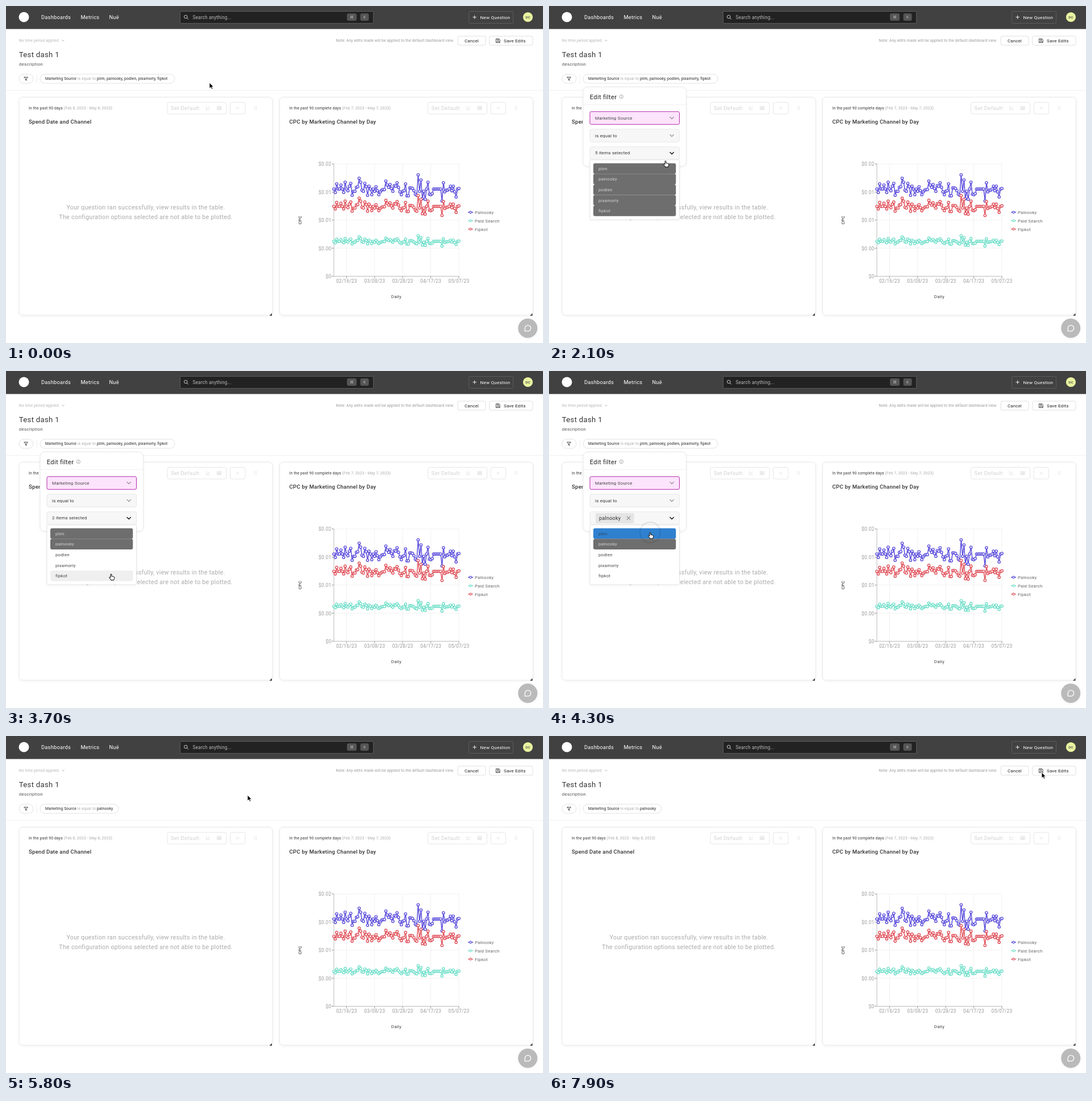
Animation of 945 by 593 pixels, one loop 8000 ms. Source, as an HTML page:

```html
<!DOCTYPE html>
<html lang="en">
<head>
<meta charset="utf-8">
<title>Dashboard filter</title>
<style>
  html, body { margin: 0; width: 100%; height: 100%; overflow: hidden; background: #fff; }
  svg { display: block; width: 945px; height: 593px; }
  text { font-family: Roboto, "Liberation Sans", sans-serif; letter-spacing: .025em; }
  .mid { font-weight: 500; }
  .dim { fill: #aaa; }
  .line { fill: none; stroke-linecap: round; stroke-linejoin: round; }
  .tools { color: #d2d2d2; }
  .tools.on { color: #555; }
</style>
</head>
<body>
<svg id="stage" viewBox="0 0 945 593">
  <defs>
    <filter id="soft" x="-20%" y="-20%" width="140%" height="140%">
      <feDropShadow dx="0" dy="1" stdDeviation="2" flood-color="#000" flood-opacity=".06"/>
    </filter>
  </defs>
</svg>
<script>
const LOOP = 8000, STEP = 100;
const SOURCES = ['plim', 'palnooky', 'podlen', 'pixamorly', 'fipkot'];
const CLICKS = { 0: 4300, 2: 2900, 3: 3300, 4: 3500 };   // when each source is deselected
const FLASH = 200;
const OPEN = 1100, LIST = 1800, CLOSE = 5300;

// Pointer stops: time, x, y
const PATH = [
  [0, 358, 135], [600, 358, 135], [900, 300, 124], [1100, 268, 128], [1200, 262, 134], [1300, 249, 146],
  [1500, 211, 252], [1600, 209, 258], [1900, 207, 262], [2000, 207, 262], [2600, 195, 324],
  [3000, 195, 324], [3200, 190, 341], [3300, 190, 341], [3500, 185, 357], [3800, 185, 357],
  [4200, 178, 284], [4400, 178, 284], [4700, 226, 268], [4900, 300, 259], [5100, 326, 245],
  [5600, 425, 104], [5800, 425, 104], [6200, 650, 72], [6500, 850, 57], [6700, 885, 63],
  [7300, 885, 63], [7900, 867, 64], [LOOP, 867, 64]
];

// Daily deviation shared by the three series
const SHAPE = [
  0, 6, -9, 0, 0, -7, 0, 6, -12, 0, 3, -5, -10, 11, 4, 4, -3, -4, -19, -12, 2, 4, -10, -4, 11,
  -5, 0, 10, 0, 4, -4, 3, 10, 5, 2, 1, 1, -14, -7, -3, -8, -1, 4, -6, -5, -11, -3, 5, 10, 4,
  3, -9, 12, 12, -2, -2, -1, 3, 9, 11, -25, 4, -16, 17, 4, 18, 0, -12, 9, 10, 8, 0, 0, 0, 0,
  0, 0, 21, -11, 5, 2, 2, 0, -5, 3, -5, 5, 14, 0, -1
];
const SERIES = [
  { name: 'Palnooky', color: '#5a4cdb', base: 322, gain: 1 },
  { name: 'Paid Search', color: '#72dfca', base: 414, gain: .4 },
  { name: 'Fipkot', color: '#e0535c', base: 352.5, gain: .76 }
];

const text = (x, mid, size, str, fill = '#444', attrs = '') =>
  `<text x="${x}" y="${mid + size * .36}" font-size="${size}" fill="${fill}" ${attrs}>${str}</text>`;
const bold = (x, mid, size, str, fill = '#333') => text(x, mid, size, str, fill, 'class="mid"');
const rect = (x, y, w, h, r, fill, stroke = 'none', attrs = '') =>
  `<rect x="${x}" y="${y}" width="${w}" height="${h}" rx="${r}" fill="${fill}" stroke="${stroke}" ${attrs}/>`;
const line = (d, color, w = 1) => `<path class="line" d="${d}" stroke="${color}" stroke-width="${w}"/>`;
const cross = (x, y, r, color, w = .9) =>
  line(`M${x - r} ${y - r}l${2 * r} ${2 * r}m0 ${-2 * r}l${-2 * r} ${2 * r}`, color, w);
const chevron = (x, y, r, color, w) => line(`M${x - r} ${y - r / 2}l${r} ${r}l${r} ${-r}`, color, w);
// Visible during the given time pairs only
const during = (times, body) => `<g data-show="${times.join(' ')}">${body}</g>`;

function header() {
  return rect(0, 0, 945, 40.5, 0, '#414141') +
    '<circle cx="31.5" cy="19.5" r="9" fill="#fff"/>' +
    text(62, 19.8, 9.3, 'Dashboards', '#fff') +
    text(131.5, 19.8, 9.3, 'Metrics', '#fff') +
    text(181.5, 19.8, 9.3, 'Nuë', '#fff') +
    rect(306.5, 9.5, 340, 21, 2, '#222', '#5c5c5c') +
    '<circle cx="316.3" cy="19" r="2.8" fill="none" stroke="#ccc"/>' + line('M318.5 21.2l2.2 2.2', '#ccc') +
    text(328.5, 19.8, 8.15, 'Search anything...', '#bbb') +
    rect(600, 13, 17, 13, 3, '#555') + rect(623.5, 13, 15, 13, 3, '#555') +
    text(608.6, 19.6, 7, '⌘', '#bbb', 'text-anchor="middle" style="font-family:\'DejaVu Sans\',sans-serif"') +
    text(631, 19.6, 6.5, 'K', '#bbb', 'text-anchor="middle"') +
    rect(814.5, 9.5, 78, 21, 2, 'none', '#5c5c5c') +
    line('M821.8 19.7h5.6m-2.8 -2.8v5.6', '#eee') +
    text(834.5, 19.8, 8.1, 'New Question', '#fff') +
    '<circle cx="918.4" cy="19.5" r="8.6" fill="#e9f3a0"/>' +
    text(918.5, 19.5, 6.2, 'DC', '#444', 'text-anchor="middle" class="mid"');
}

function pill(width, list, end = '') {
  return rect(60, 120, width, 16, 8, '#fff', '#e2e2e2') +
    text(69, 128, 6.7, `Marketing Source <tspan class="dim">is equal to</tspan> ${list}`, '#222') + end;
}

function toolbar() {
  const all = SOURCES.join(', ');
  return text(22.8, 60.5, 6.6, 'No time period applied', '#b5b5b5') + chevron(100.5, 60.8, 1.7, '#aaa') +
    text(22.8, 85.5, 13.1, 'Test dash 1', '#333') +
    text(22.8, 101.8, 8, 'description', '#555') +
    text(580.5, 61, 6.65, 'Note: Any edits made will be applied to the default dashboard view.', '#999') +
    rect(795, 53, 49, 16, 3, '#fff', '#e0e0e0') + text(807, 60.8, 7.8, 'Cancel', '#222') +
    rect(850.5, 53, 76.5, 16, 3, '#fff', '#e0e0e0') + text(876, 60.8, 7.95, 'Save Edits', '#222') +
    line('M862.6 57.8h5l1.6 1.6v5h-6.6zM864.2 57.8v2h3v-2M864.2 64.4v-2.6h3.4v2.6', '#444', .9) +
    rect(23, 120, 25, 16, 8, '#fff', '#e2e2e2') +
    line('M32 125.2h6.4l-2.5 3v3l-1.4 -1v-2z', '#333', .9) +
    line('M54 121v14', '#eee') +
    during([0, 900, 1500, CLOSE], pill(237, all)) +
    during([900, 1500], pill(237, all.replace('fipkot', '...'), cross(287.2, 128, 1.8, '#666'))) +
    during([CLOSE, LOOP], pill(138, SOURCES[1])) +
    line('M0 148.5H945', '#f0f0f0');
}

function card(x, range, dates, title, id) {
  const icon = 'currentColor', dots = [0, 1, 2].map(i =>
    `<circle cx="437.8" cy="${177 + i * 2.5}" r=".8"/><circle cx="440.6" cy="${177 + i * 2.5}" r=".8"/>`).join('');
  return `<g transform="translate(${x} 0)">` +
    rect(23, 160.5, 446, 383.5, 6, '#fff', '#e8e8e8', 'filter="url(#soft)"') +
    text(40, 179.5, 6.75, `${range} <tspan class="dim">(${dates})</tspan>`, '#333') +
    bold(40, 203.2, 9.6, title) +
    rect(284, 169.5, 104, 20.5, 3, '#fff', '#e6e6e6') + rect(394.5, 169.5, 26.5, 20.5, 3, '#fff', '#e6e6e6') +
    `<g class="tools" id="${id}">` + text(290, 179.8, 9.6, 'Set Default:', icon) + '<g opacity=".75">' +
    line('M352.4 176v6.5h6.2M354 180.5l1.6 -2l1.3 1l1.6 -2.3', icon, .8) +
    line('M372 176.5h6.4v6h-6.4zM372 178.5h6.4M372 180.5h6.4M374.1 178.5v4M376.3 178.5v4', icon, .8) +
    cross(407.7, 179.8, 2, icon, .8) + `<g fill="${icon}">${dots}</g></g></g>` +
    '<path d="M468 540.5v4.5h-4.5z" fill="#444"/></g>';
}

function chart() {
  let out = '';
  ['$0.02', '$0.01', '$0.01', '$0.00', '$0'].forEach((label, i) => {
    const y = 278 + i * 49.4;
    out += line(`M577 ${y}H797`, '#f1f1f1') + line(`M573.5 ${y}h3.5`, '#999') +
      text(572.5, y + .3, 8.5, label, '#999', 'text-anchor="end"');
  });
  ['02/16/23', '03/08/23', '03/28/23', '04/17/23', '05/07/23'].forEach((label, i) => {
    const x = 599.3 + i * 49.4;
    out += line(`M${x} 278V475.6`, '#f1f1f1') + line(`M${x} 475.6v3.5`, '#999') +
      text(x, 484.3, 8.4, label, '#999', 'text-anchor="middle"');
  });
  out += line('M577 278V475.6H797', '#bbb') +
    text(686.8, 510.7, 7.9, 'Daily', '#444', 'text-anchor="middle"') +
    `<g transform="rotate(-90 517 376.7)">${text(517, 376.7, 7.5, 'CPC', '#444', 'text-anchor="middle" class="mid"')}</g>`;
  SERIES.forEach((s, i) => {
    const pts = SHAPE.map((d, k) => [(577 + k * 220 / 89).toFixed(1), (s.base + d * s.gain).toFixed(1)]);
    const key = 363 + i * 14.8;
    out += line('M' + pts.join('L'), s.color, 1.5) +
      `<g fill="#fff" stroke="${s.color}" stroke-width="1.4">` +
      pts.map(([x, y]) => `<circle cx="${x}" cy="${y}" r="2.15"/>`).join('') + '</g>' +
      line(`M813.5 ${key}h8`, s.color, 1.4) +
      `<circle cx="817.5" cy="${key}" r="1.8" fill="#fff" stroke="${s.color}" stroke-width="1.2"/>` +
      text(825, key + .2, 7.8, s.name, '#666');
  });
  return out;
}

function popup() {
  const select = (y, fill, stroke, arrow) =>
    rect(72, y, 157.5, 22.5, 2.5, fill, stroke) + chevron(216.2, y + 11.2, 3.2, arrow, 1.2);
  const rows = SOURCES.map((name, i) =>
    rect(78, 276.7 + i * 18.6, 145.3, 18.6, 3, 'none', 'none', 'class="row"') +
    text(87, 286 + i * 18.6, 7.8, name, '#444', 'class="name"')).join('');
  return during([OPEN, CLOSE],
    rect(60, 142.5, 181.5, 139.5, 8, '#fff', '#e8e8e8', 'filter="url(#soft)"') +
    text(71.8, 159.5, 11.2, 'Edit filter', '#222') +
    '<circle cx="127.3" cy="159.6" r="3.2" fill="none" stroke="#999" stroke-width=".8"/>' +
    line('M127.3 159.4v1.7M127.3 157.9v.1', '#999', .8) +
    line('M60.5 173.5H241', '#f1f1f1') +
    select(185.8, '#fce4fc', '#b42aaa', '#888') + text(81, 197, 8, 'Marketing Source') +
    select(216.8, '#f7f7f7', '#e8e8e8', '#888') + text(81, 227.8, 8, 'is equal to', '#333') +
    select(247.8, '#f7f7f7', '#e8e8e8', '#888') +
    '<g id="count">' + text(81, 258.6, 8, '', '#333') + '</g>' +
    during([CLICKS[0], CLOSE],
      rect(82, 250, 67.5, 18, 2.5, '#e5e5e5') + text(88, 258.8, 9.1, SOURCES[1], '#333') +
      cross(140, 258.8, 3, '#666', 1)) +
    during([LIST, CLOSE],
      chevron(216.2, 259, 3.2, '#222', 1.4) +
      rect(72, 270.8, 157.5, 105, 2, '#fff', '#e5e5e5', 'filter="url(#soft)"') + rows));
}

function chat() {
  return '<circle cx="918.2" cy="567" r="17" fill="#bababa" filter="url(#soft)"/>' +
    line('M913.2 571.8v-4.8a5.2 5.2 0 1 1 5.2 5.2h-5.2z', '#fff', 1.3);
}

function pointer() {
  const clicks = [OPEN, LIST, ...Object.values(CLICKS), CLOSE];
  return '<g id="pointer">' +
    during(clicks.flatMap(t => [t, t + FLASH]),
      '<circle r="18" fill="none" stroke="#000" stroke-opacity=".12" stroke-width="1.5"/>') +
    '<path id="arrow" d="M0 0V10L2.4 7.9L4 11.4L5.7 10.6L4.2 7.2H7.2Z" fill="#000" stroke="#fff" stroke-width=".8"/>' +
    '<path id="hand" d="M-1 1Q0 -.6 1 1V4.4Q2 3.6 2.7 4.7Q3.8 4 4.4 5.1Q5.9 4.8 5.9 6.4Q6 8.4 4.8 9.8V11H-.4V10Q-2.3 8.4 -3.6 6.2Q-3 4.8 -1 6.5Z" fill="#fff" stroke="#000" stroke-linejoin="round"/></g>';
}

const stage = document.getElementById('stage');
stage.insertAdjacentHTML('beforeend', header() + toolbar() +
  card(0, 'In the past 90 days', 'Feb 8, 2023 - May 8, 2023', 'Spend Date and Channel', 'left') +
  text(246, 354.5, 10.7, 'Your question ran successfully, view results in the table.', '#aaa', 'text-anchor="middle"') +
  text(246, 371.3, 10.7, 'The configuration options selected are not able to be plotted.', '#aaa', 'text-anchor="middle"') +
  card(458.5, 'In the past 90 complete days', 'Feb 7, 2023 - May 7, 2023', 'CPC by Marketing Channel by Day', 'right') +
  chart() + popup() + chat() + pointer());

const $ = q => stage.querySelector(q), $$ = q => [...stage.querySelectorAll(q)];
const timed = $$('[data-show]').map(el => ({ el, times: el.dataset.show.split(' ').map(Number) }));
const rows = $$('.row'), names = $$('.name'), count = $('#count text');
const within = (t, times) => times.some((from, i) => i % 2 === 0 && t >= from && t < times[i + 1]);
const display = (el, on) => { el.style.display = on ? '' : 'none'; };

function place(t) {
  const i = PATH.findIndex(p => p[0] > t);
  const [t0, x0, y0] = PATH[i - 1], [t1, x1, y1] = PATH[i];
  const k = (t - t0) / (t1 - t0);
  return [x0 + (x1 - x0) * k, y0 + (y1 - y0) * k];
}

function draw(t) {
  const [x, y] = place(t);
  timed.forEach(({ el, times }) => display(el, within(t, times)));

  let left = 0;
  rows.forEach((row, i) => {
    const click = CLICKS[i] ?? Infinity;
    const flash = t >= click && t < click + FLASH;
    const hover = x > 78 && x < 223 && Math.abs(y + 2 - 286 - i * 18.6) < 9.3;
    if (t < click) left++;
    row.setAttribute('fill', flash ? '#2f80cf' : t < click ? '#6e6e6e' : hover ? '#efefef' : 'none');
    names[i].setAttribute('fill', flash ? '#2a4661' : t < click ? '#d4d4d4' : '#444');
  });
  count.textContent = left > 1 ? `${left} items selected` : '';

  $('#left').classList.toggle('on', t >= 4800 && t < 5500);
  const hand = within(t, [900, 1300, 1500, 4700]);
  display($('#hand'), hand);
  display($('#arrow'), !hand);
  $('#pointer').setAttribute('transform', `translate(${x.toFixed(1)} ${y.toFixed(1)})`);
}

function tick() {
  draw(Math.floor(performance.now() % LOOP / STEP) * STEP);
  requestAnimationFrame(tick);
}
tick();
</script>
</body>
</html>
```
